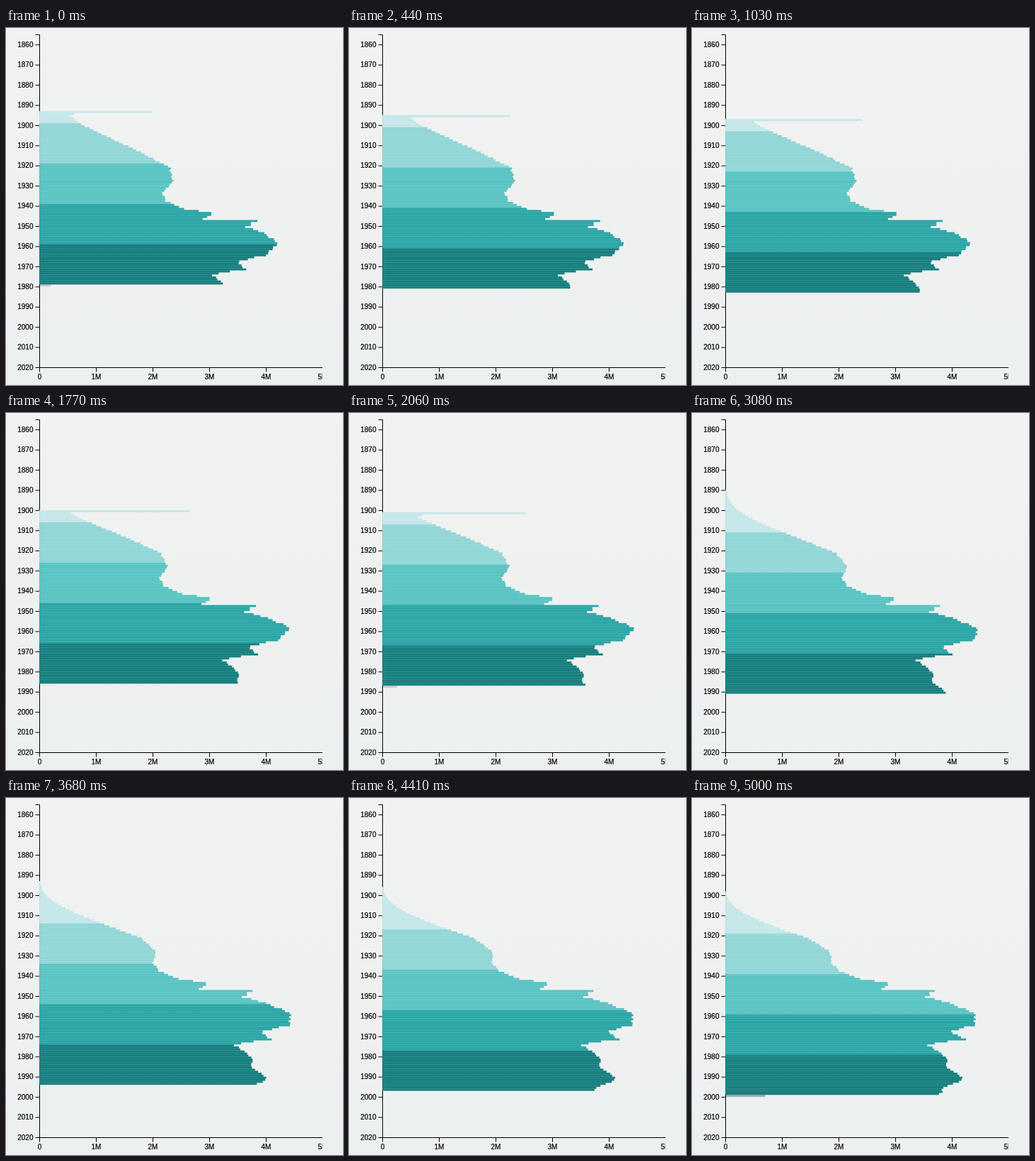
An HTML page with a canvas for the animation above (5.15 s loop, 476x503 px).

```html
<!DOCTYPE html>
<html lang="en">
<head>
<meta charset="utf-8">
<title>Population by birth year</title>
<style>
  html, body { margin: 0; width: 100%; height: 100%; overflow: hidden; }
  body { position: relative; background: linear-gradient(#f1f2f2, #edf0f0); }
  svg, canvas { position: absolute; left: 0; top: 0; width: 476px; height: 503px; }
  svg { clip-path: inset(0 29px 0 0); }
  path { stroke: #000; fill: none; }
  text { font: 10px "Liberation Sans", Arial, sans-serif; stroke: #000; stroke-width: 0.2; }
</style>
</head>
<body>
<svg id="axes" viewBox="0 0 476 503"></svg>
<canvas id="bars" width="952" height="1006"></canvas>
<script>
const LEFT = 47, BOTTOM = 478, ROW = 469 / 165, PX_PER_M = 80;
const LOOP = 5150, STEPS = 35;

// Turning points: birth year and adult cohort size in pixels
const cohorts = [
  [1893, 112], [1899, 112], [1904, 132], [1913, 172], [1921, 201], [1928, 197],
  [1933, 178], [1937, 182], [1941, 206], [1943, 248], [1946, 232], [1947, 309],
  [1950, 293], [1953, 327], [1958, 358], [1964, 354], [1967, 320], [1971, 341],
  [1972, 317], [1974, 294], [1980, 338], [1984, 347], [1991, 394], [1995, 378]
];

// Step number and the year reached, easing apart
const clock = [[0, 1979.25], [7, 1983], [30, 1997], [34, 1999.36]];

const shades = [[24, 127, 127], [44, 166, 167], [90, 196, 195], [146, 214, 215], [197, 231, 233]];
const black = [0, 0, 0];

const mix = (a, b, k) => a + (b - a) * k;
const ease = p => p < 0.5 ? 4 * p ** 3 : 1 - 4 * (1 - p) ** 3;
const yOf = year => BOTTOM - (2020 - year) * ROW;

// Piecewise linear lookup in [x, y] points
function along(points, x) {
  const i = points.findIndex(p => p[0] >= x);
  if (i === 0) return points[0][1];
  if (i < 0) return points[points.length - 1][1];
  const [x0, y0] = points[i - 1], [x1, y1] = points[i];
  return mix(y0, y1, (x - x0) / (x1 - x0));
}

// Seeded noise from -1 to 1
function noise(seed) {
  const v = Math.sin(seed * 12.9898) * 43758.5453;
  return 2 * (v - Math.floor(v)) - 1;
}

// Young cohorts grow by immigration, old ones shrink by Gompertz mortality
const growth = age => 1 - 0.2 * Math.max(0, 1 - age / 28);
const survival = age => Math.exp(-4.13e-4 * Math.exp(0.093 * age));

// Until 1989 everyone of 85 and over shares the top bar
const oldest = year => year < 1990 ? year - 86 : year - 101;
const alive = (born, year) => born >= oldest(year) && born < year;

function barLength(born, year) {
  if (!alive(born, year)) return 0;
  if (year < 1990 && born === oldest(year)) return 170 + 6 * (year - 1979);
  const age = year - 1 - born;
  const size = along(cohorts, born) * growth(age) * survival(age);
  return Math.max(1, size * (1 + 0.01 * noise(born)));
}

function shade(born, year) {
  if (born >= year) return black;
  return shades[Math.min(4, Math.floor((year - 1 - born) / 20))];
}

const ctx = document.getElementById("bars").getContext("2d");
ctx.scale(2, 2);

function drawBar(born, year, k) {
  const before = alive(born, year), after = alive(born, year + 1);
  if (!before && !after) return;
  const from = shade(born, year), to = shade(born, year + 1);
  const rgb = from.map((c, i) => Math.round(mix(c, to[i], k)));
  ctx.globalAlpha = !before ? k ** 0.7 : !after ? 1 - k : 1;
  ctx.fillStyle = `rgb(${rgb})`;
  const len = mix(barLength(born, year), barLength(born, year + 1), k);
  ctx.fillRect(LEFT, yOf(born), len, ROW);
}

function draw(ms) {
  const step = Math.min(STEPS - 1, Math.floor((ms + 8) * STEPS / LOOP));
  const now = along(clock, step);
  const year = Math.floor(now), k = ease(now - year);
  ctx.clearRect(0, 0, 476, 503);
  const top = Math.min(oldest(year), oldest(year + 1));
  for (let born = top; born <= year; born++) drawBar(born, year, k);
}

function buildAxes() {
  const x0 = LEFT + 0.5, y0 = BOTTOM + 0.5, x5 = x0 + 5 * PX_PER_M;
  let lines = `M${x0 - 6} ${yOf(1855) + 0.5}H${x0}V${y0}H${x5}`;
  let labels = "";
  for (let year = 1860; year <= 2020; year += 10) {
    const y = yOf(year) + 0.5;
    lines += `M${x0} ${y}h-6`;
    labels += `<text x="${x0 - 9}" y="${y}" dy=".32em" text-anchor="end">${year}</text>`;
  }
  for (let m = 0; m <= 5; m++) {
    const x = x0 + m * PX_PER_M;
    lines += `M${x} ${y0}v6`;
    labels += `<text x="${x}" y="${y0 + 9}" dy=".71em" text-anchor="middle">${m ? m + "M" : 0}</text>`;
  }
  document.getElementById("axes").innerHTML = `<path d="${lines}"/>${labels}`;
}

buildAxes();
const start = performance.now();
function tick() {
  draw((performance.now() - start) % LOOP);
  requestAnimationFrame(tick);
}
tick();
</script>
</body>
</html>
```
